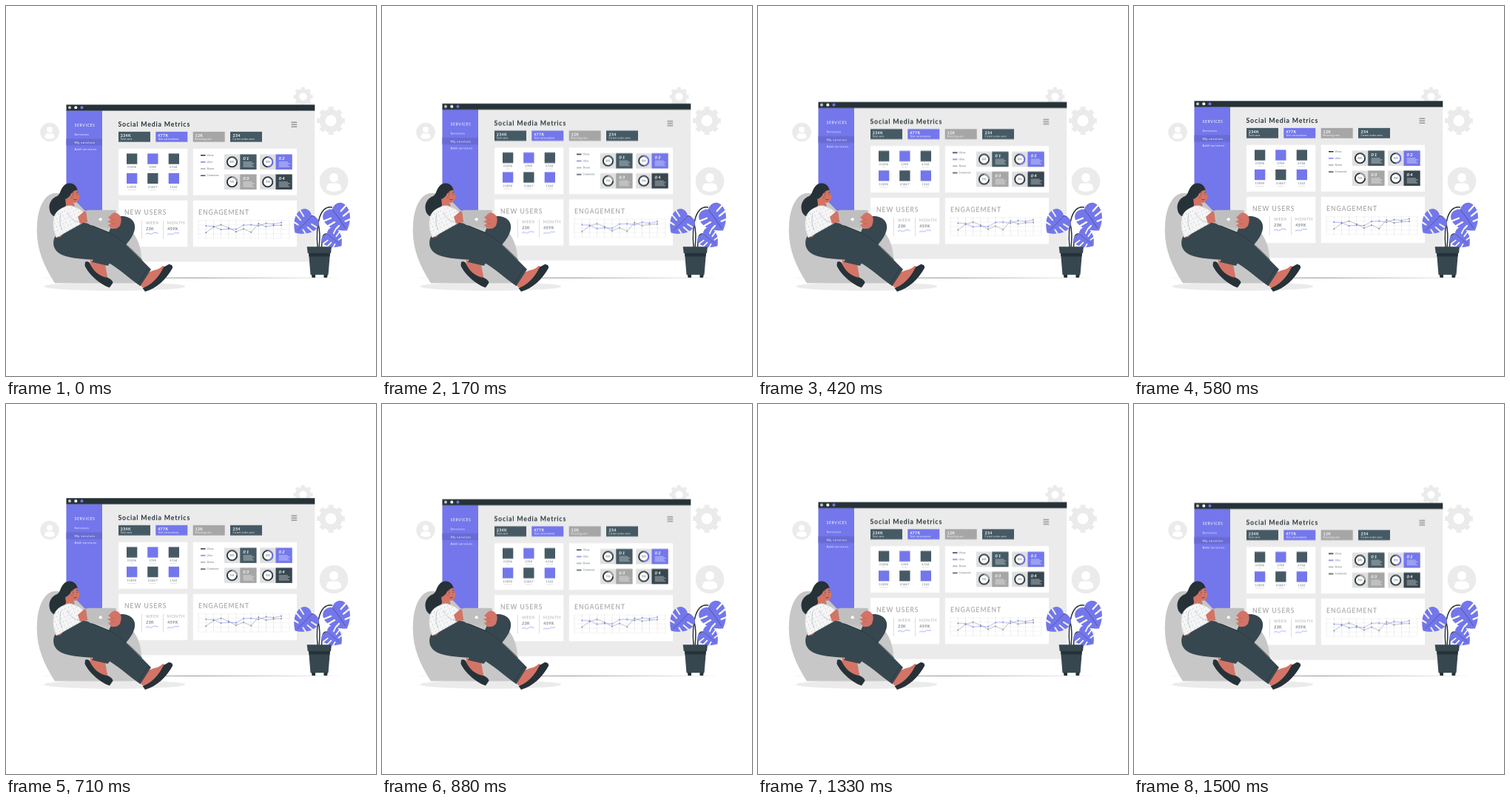
An HTML page that plays this animation: 500x500 px, repeating every 1.54 s.

```html
<!DOCTYPE html>
<html lang="en">
<head>
<meta charset="utf-8">
<title>Dashboard</title>
<style>
  html, body { margin: 0; width: 100%; height: 100%; overflow: hidden; background: #fff; }
  svg { display: block; width: 100vw; height: 100vh; }
  text { font-family: Lato, sans-serif; }
  .window { animation: float 1540ms -60ms linear infinite; }
  @keyframes float {
    0%, 100% { transform: translateY(-.3px); }
    50% { transform: translateY(-7px); }
  }

  .ink { color: #263238; }
  .slate { color: #455a64; }
  .violet { color: #7377eb; }
  .grey { color: #a6a6a6; }
  .fill { fill: currentColor; }
  .line { fill: none; stroke: currentColor; }
  .light { fill: #ebebeb; }
  .skin { fill: #d37466; }
  .trousers { fill: #37474f; }

  .title { font: 700 8.8px Lato, sans-serif; letter-spacing: .8px; fill: #263238; }
  .menu { font-size: 4.6px; letter-spacing: .38px; fill: #fff; }
  .stat { font-size: 5.2px; font-weight: 700; letter-spacing: .4px; fill: #fff; }
  .note { font-size: 3px; letter-spacing: .15px; fill: #fff; }
  .head { font-size: 8.5px; letter-spacing: 1.05px; fill: #999; }
  .sub { font-size: 5.6px; letter-spacing: .5px; fill: #b0b0b0; }
  .value { font: italic 5.8px Lato, sans-serif; letter-spacing: .2px; fill: #455a64; }
  .count { font-size: 4px; letter-spacing: .25px; fill: #607079; text-anchor: middle; }
  .tiny { font-size: 2.3px; fill: #b5b5b5; text-anchor: middle; }
  .legend { font-size: 3.4px; fill: #6b7a82; }
  .number { font: italic 700 6.3px Lato, sans-serif; letter-spacing: .8px; fill: #fff; }
  .percent { font-size: 3px; fill: #455a64; text-anchor: middle; }
</style>
</head>
<body>
<svg viewBox="0 0 500 500">
  <defs>
    <g id="avatar">
      <circle class="light" r="19.300"/>
      <circle cy="-5" r="6" fill="#fff"/>
      <path d="M-10.500 11Q-10 2.500 -4 2.500H4Q10 2.500 10.500 11Q0 17 -10.500 11Z" fill="#fff"/>
    </g>
    <g id="gear" fill="none" stroke="#ebebeb">
      <circle r="11.500" stroke-width="8"/>
      <circle r="16.500" stroke-width="5" pathLength="16" stroke-dasharray="1" transform="rotate(-11.250)"/>
    </g>
    <rect id="stat" class="fill" width="43" height="13.800"/>
    <rect id="icon" class="fill" width="14.300" height="14.300"/>
    <g id="card">
      <rect width="43.500" height="20.500" fill="#e0e0e0"/>
      <rect class="fill" x="21.300" width="22.200" height="20.500"/>
      <circle cx="10.500" cy="10.300" r="6.600" fill="#fff" stroke="#263238" stroke-width="1.900"/>
      <path d="M25.500 10.500h12M25.500 12.500h15M25.500 14.500h12.500M25.500 16.500h14.500" stroke="#fff" stroke-width=".7" opacity=".85"/>
    </g>
    <mask id="slits" maskUnits="userSpaceOnUse" x="-24" y="-12" width="48" height="50">
      <path fill="#fff" d="M-24-12h48v50h-48z"/>
      <path d="M-21 5L-8 8M-20 14L-7 15M-14 24L-5 22M21 5L8 8M20 14L7 15M14 24L5 22" stroke="#000" stroke-width="2.200" stroke-linecap="round"/>
    </mask>
    <g id="leaf">
      <path mask="url(#slits)" class="violet fill" d="M0 0C-5-5-17-5-17.500 8C-17 20-8 28 0 33C8 28 17 20 17.500 8C17-5 5-5 0 0Z"/>
      <path d="M0 0Q1 14 0 29" class="ink line" stroke-width=".4"/>
    </g>
    <marker id="dot" markerUnits="userSpaceOnUse" markerWidth="4" markerHeight="4" refX="2" refY="2">
      <circle cx="2" cy="2" r=".9" fill="context-stroke"/>
    </marker>
    <pattern id="dots" width="7" height="7" patternUnits="userSpaceOnUse" patternTransform="rotate(20)">
      <path fill="#f5f5f5" d="M0 0h7v7H0z"/>
      <path d="M1 2h1M5 5h1" stroke="#90a4ae" stroke-width=".8"/>
    </pattern>
  </defs>

  <use href="#gear" transform="translate(401.500 122.500) scale(.69)"/>
  <use href="#gear" x="439" y="155"/>
  <use href="#avatar" transform="translate(59 170.500) scale(.66)"/>
  <use href="#avatar" x="443" y="237"/>
  <path class="ink fill" d="M41 367.200L250 366.900L460 367.200L250 367.600Z"/>

  <g class="window">
    <path class="light" d="M81.500 134H417.300V346.300H81.500z"/>
    <path class="violet fill" d="M81.500 142H130V346.300H81.500z"/>
    <path d="M81.500 180.300H130v9H81.500z" fill="#686bd4"/>
    <path class="ink fill" d="M81.500 134H417.300v8.300H81.500z"/>
    <circle cx="86" cy="138" r="2" fill="#c7c7c7"/>
    <circle cx="94.300" cy="138" r="2" fill="#fff"/>
    <circle cx="102.500" cy="138" r="2" class="violet fill"/>

    <g class="menu">
      <text x="92.500" y="164.200" style="font-size:5.200px;letter-spacing:.6px">SERVICES</text>
      <text x="92.500" y="176.200">Services</text>
      <text x="92.500" y="186.400">My services</text>
      <text x="92.500" y="196.200">Add services</text>
    </g>

    <text class="title" x="151.500" y="164.200">Social Media Metrics</text>
    <path d="M385.500 158h7.700m-7.700 3h7.700m-7.700 3h7.700" stroke="#858585" stroke-width="1.400"/>

    <use href="#stat" x="152" y="170.700" class="slate"/>
    <use href="#stat" x="202.300" y="170.700" class="violet"/>
    <use href="#stat" x="252.700" y="170.700" class="grey"/>
    <use href="#stat" x="303" y="170.700" class="slate"/>
    <g class="stat">
      <text x="154.800" y="177.500">234K</text><text x="205.200" y="177.500">477K</text>
      <text x="255.500" y="177.500">12K</text><text x="306.500" y="177.500">254</text>
    </g>
    <g class="note">
      <text x="154.800" y="182">Total users</text><text x="205.200" y="182">Total conversations</text>
      <text x="255.500" y="182">Returning users</text><text x="306.500" y="182">Current active users</text>
    </g>

    <path fill="#fff" d="M152 193.700h93.300v62.800H152zM252.800 193.700H393v62.800H252.800zM152 263.500h93.300v62.700H152zM252.800 263.500H393v62.700H252.800z"/>

    <use href="#icon" x="163" y="200.200" class="slate"/>
    <use href="#icon" x="191.200" y="200.200" class="violet"/>
    <use href="#icon" x="219.700" y="200.200" class="slate"/>
    <use href="#icon" x="163" y="226.700" class="violet"/>
    <use href="#icon" x="191.200" y="226.700" class="slate"/>
    <use href="#icon" x="219.700" y="226.700" class="violet"/>
    <g class="count">
      <text x="170" y="220">31096</text><text x="198.300" y="220">3789</text><text x="226.500" y="220">6744</text>
      <text x="170" y="246.400">10090</text><text x="198.300" y="246.400">23467</text><text x="226.500" y="246.400">1342</text>
    </g>
    <g class="tiny">
      <text x="170" y="223.300">Likes</text><text x="198.300" y="223.300">Followers</text><text x="226.500" y="223.300">Followers</text>
      <text x="170" y="249.700">Subscribers</text><text x="198.300" y="249.700">Followers</text><text x="226.500" y="249.700">Contacts</text>
    </g>

    <g stroke-width="1.400">
      <path class="ink line" d="M263 202.600h6.500M263 230h6.500"/>
      <path class="violet line" d="M263 211.700h6.500"/>
      <path class="grey line" d="M263 220.800h6.500"/>
    </g>
    <g class="legend">
      <text x="271.500" y="203.700">Views</text><text x="271.500" y="212.800">Likes</text>
      <text x="271.500" y="221.900">Shares</text><text x="271.500" y="231.100">Comments</text>
    </g>
    <use href="#card" x="295" y="201.300" class="slate"/>
    <use href="#card" x="343.200" y="201.300" class="violet"/>
    <use href="#card" x="295" y="228.300" class="grey"/>
    <use href="#card" x="343.200" y="228.300" style="color:#37474f"/>
    <g stroke-width="1.900">
      <path class="violet line" d="M353.700 205a6.600 6.600 0 0 1 0 13.200"/>
      <path class="grey line" d="M305.500 232a6.600 6.600 0 0 1 6.600 6.600"/>
      <path class="slate line" d="M305.500 205a6.600 6.600 0 0 1 6.600 6.600M353.700 232a6.600 6.600 0 0 1 6.600 6.600"/>
    </g>
    <g class="percent">
      <text x="305.500" y="212.700">80%</text><text x="353.700" y="212.700">50%</text>
      <text x="305.500" y="239.700">75%</text><text x="353.700" y="239.700">70%</text>
    </g>
    <g class="number">
      <text x="320.200" y="208.800">01</text><text x="368.500" y="208.800">02</text>
      <text x="320.200" y="235.800">03</text><text x="368.500" y="235.800">04</text>
    </g>

    <text class="head" x="160" y="283">NEW USERS</text>
    <text class="sub" x="189" y="295.700">WEEK</text>
    <text class="sub" x="217.700" y="295.700">MONTH</text>
    <text class="value" x="189" y="303.700">23K</text>
    <text class="value" x="218" y="303.700">459K</text>
    <path d="M183.300 290.500v25M212.500 290.500v25" stroke="#c7c7c7" stroke-width=".6"/>
    <path class="violet line" stroke-width=".6" d="M189 309q2.500-2 4.500-.5t4 0t3.500-1.500t4.500 1M218 310q2.500-2 4.500-1t4-.5t3-1t4.500 0"/>

    <text class="head" x="260" y="283">ENGAGEMENT</text>
    <g fill="none" stroke="#d5d5d5" stroke-width=".4">
      <path stroke-dasharray="1 .7" d="M260 290.500H383M260 296.500H383M260 302.500H383M260 308.500H383M260 314.800H383"/>
      <path d="M260 290v25M270.300 290v25M280.500 290v25M290.500 290v25M300.700 290v25M311 290v25M321 290v25M331.200 290v25M341.300 290v25M351.500 290v25M361.500 290v25M372 290v25M383 290v25"/>
    </g>
    <g fill="none" stroke-width=".5">
      <polyline stroke="#78828a" marker-start="url(#dot)" marker-mid="url(#dot)" marker-end="url(#dot)" points="270.300,307 280.500,299.500 290.500,296.500 300.700,300.500 311,306 321,302 331.200,306.500 341.300,295 351.500,299 361.500,297.500 372,297"/>
      <polyline stroke="#7377eb" marker-start="url(#dot)" marker-mid="url(#dot)" marker-end="url(#dot)" points="270.300,298 280.500,298.500 290.500,303 300.700,302 311,302.500 321,297 331.200,296.500 341.300,298 351.500,294.500 361.500,295.500 372,293.500"/>
    </g>
  </g>

  <ellipse class="light" cx="147" cy="379" rx="95.500" ry="5.800"/>

  <!-- beanbag -->
  <path fill="#c7c7c7" d="M66 374.500C50 350 40 325 42 297C43 268 55 253 66 253C85 252 96 265 106 276L150 290C175 300 184 325 183 345Q182 362 177 374.500Z"/>

  <!-- back leg -->
  <path class="skin" d="M114 343L134 349L137 366L139 371L128 368L114 352Z"/>
  <path class="ink fill" d="M107 346Q110 344 113 347C117 357 126 366 137 367Q144 370 144.500 374L140 380.500C128 377 112 363 106.500 351Z"/>
  <path class="trousers" d="M148 285C164 281 176 289 174 301C172 316 154 330 137.500 351L116 346L138 308Z"/>

  <!-- front leg -->
  <path class="skin" d="M190 361L200 357Q207 356 212 351L217 354L196 380L184 380L180 375Z"/>
  <path class="ink fill" d="M184.500 381C196 378 207 366 213 353L220 349Q226 349.500 225 354C217 369 203 382 188 386Z"/>
  <path class="trousers" d="M66 312L100 293Q108 292 116 296L140 306C158 316 178 338 196 356L181.500 378.500C165 367 150 352 133 344C110 342 88 342 75 336C64 331 62 320 66 312Z"/>
  <path fill="none" stroke="#263238" stroke-width=".6" d="M116 297L140 306.500C158 316.500 170 329 184 343M178.500 375.500L192.500 353.500"/>

  <!-- hair and head -->
  <path class="ink fill" d="M96 247C94 239 83 237 78 243C73 248 74 254 69 257C61 260 57 268 59 276C61 285 69 287 74 281C79 276 80 270 83 265L88 254Z"/>
  <path class="skin" d="M66 308Q72 318 78 306L72 300ZM80 261L87 256L93 270L82 275Z"/>
  <path class="skin" d="M85 250Q91 246 96 248L99.500 257Q99 266 92 266Q84 264 83 257Z"/>
  <path class="ink fill" d="M80 246Q90 238 97 248.500Q89 249 86 257L81 261Z"/>
  <path fill="none" stroke="#263238" stroke-width=".7" d="M88.500 252.500l3-.8M95 251.500l2.300.4M90 255h1.500M95.500 254.500h1.200M91.500 261.500q2 1 4-.3"/>
  <circle cx="89" cy="258.500" r="1.600" fill="#c0574d" opacity=".5"/>

  <!-- shirt, arms and tablet -->
  <path fill="url(#dots)" stroke="#cfd8dc" stroke-width=".4" d="M78 272Q86 268 91 271Q100 274 105 279L102 294L68 313C64 304 62 291 66 282Q70 275 78 272Z"/>
  <path class="skin" d="M97 285L106 277Q111 278 110 285L111 292L100 294Z"/>
  <path fill="none" stroke="#90a4ae" stroke-width=".5" d="M83 279Q88 291 101 293M74 280Q71 292 76 303"/>
  <path fill="#bfbfbf" d="M110.500 275.800H146.500Q149.500 275.800 149 279L146 301L114 296Q110.500 294 110 291L108.300 278.500Q108.200 276 110.500 275.800Z"/>
  <circle cx="127.700" cy="288.300" r="2.100" fill="#fff"/>
  <path class="skin" d="M143 281Q147 277 153 282Q158 287 154 297Q149 303 142 300L138 296L142 294L137 291L142 289L138 286Z"/>
  <path fill="none" stroke="#a9554b" stroke-width=".5" d="M142 289l5 .5M142 294l5 .5"/>

  <!-- plant -->
  <g class="ink line" stroke-width="1.500">
    <path d="M421 327C418 292 425 269 441 272"/>
    <path d="M423 327C426 300 421 281 411 284"/>
    <path d="M426.500 327C427 313 428 306 435 308.500"/>
  </g>
  <use href="#leaf" transform="translate(441 275) rotate(-35) scale(1.050)"/>
  <use href="#leaf" transform="translate(413 284) rotate(45) scale(.96)"/>
  <use href="#leaf" transform="translate(434 308) rotate(-50) scale(.77)"/>
  <path class="ink fill" d="M412.500 361h5.500v6h-4.500zM429.500 361h5.500l-1 6h-4.500z"/>
  <path class="trousers" d="M409 333H438L435.500 363.300H411.500Z"/>
  <path class="ink fill" d="M409 333H438L437.500 338.500H409.500Z"/>
  <path class="trousers" d="M406.700 325.300H440L439 334H407.700Z"/>
</svg>
</body>
</html>
```
